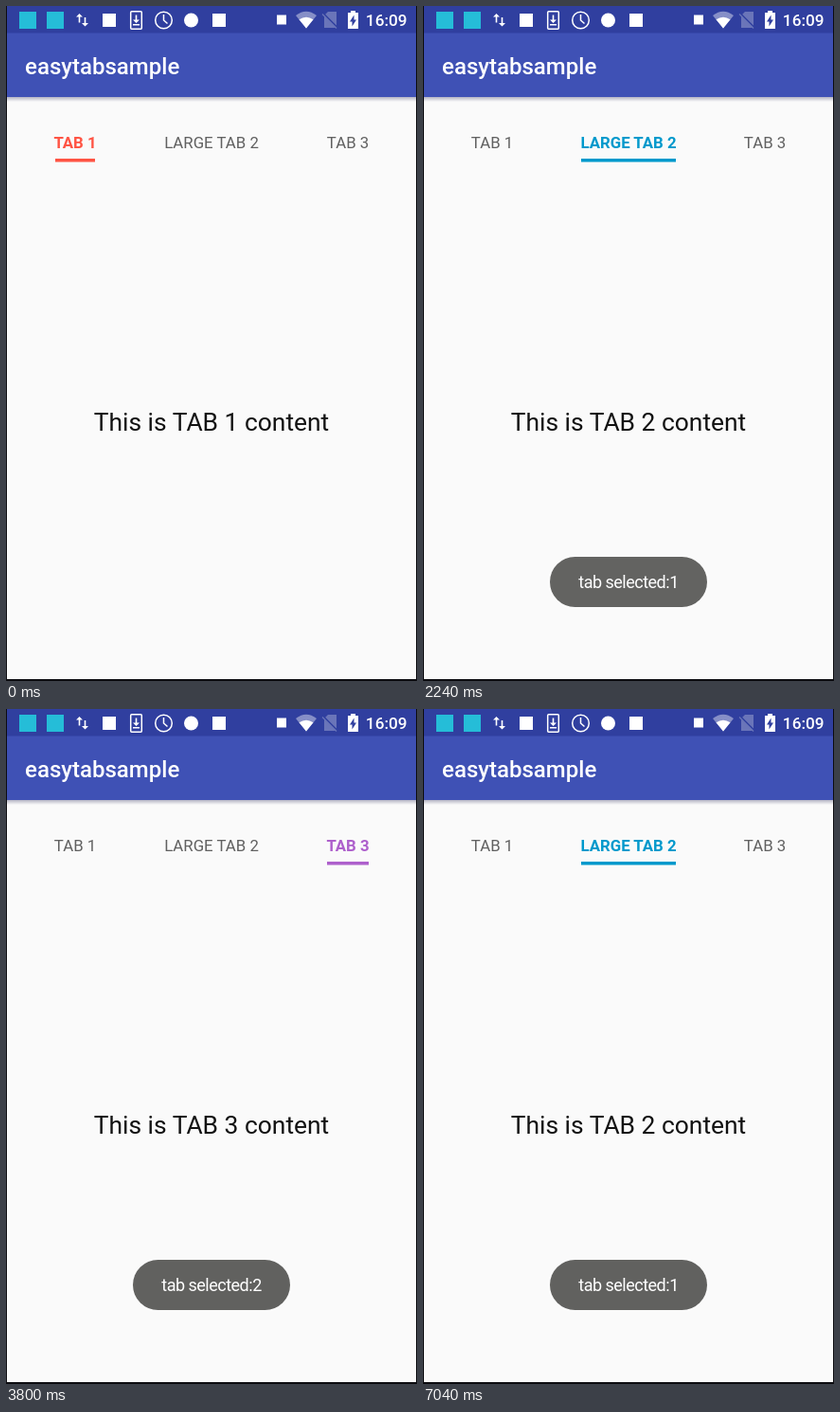
Write an HTML page that moves like this. It is 434 by 712 pixels and loops after 8 s.

```html
<!DOCTYPE html>
<html lang="en">
<head>
<meta charset="utf-8">
<title>Tabs</title>
<style>
  html, body { margin: 0; width: 100%; height: 100%; overflow: hidden; background: #fafafa; }
  svg { display: block; width: 434px; height: 712px; font-family: Roboto, sans-serif; }
  .mid { text-anchor: middle; }
  .tab { font-size: 16.8px; }
  .page { font-size: 26.4px; fill: #121212; }
  .toast { font-size: 18px; letter-spacing: -.5px; fill: #fff; }
</style>
</head>
<body>
<svg viewBox="0 0 434 712">
  <defs>
    <linearGradient id="shade" x2="0" y2="1">
      <stop offset="0" stop-color="#b4b4c4"/>
      <stop offset="1" stop-color="#fafafa"/>
    </linearGradient>
  </defs>
  <rect width="434" height="712" fill="#fafafa"/>
  <g id="pages"></g>
  <rect y="96" width="434" height="5" fill="url(#shade)"/>
  <rect y="28" width="434" height="68" fill="#3f51b5"/>
  <rect width="434" height="28.5" fill="#303f9f"/>
  <text x="20" y="71.5" font-size="24" font-weight="500" fill="#fff">easytabsample</text>

  <g fill="#fff">
    <g fill="#25bdd8">
      <rect x="14" y="6" width="18" height="18"/>
      <rect x="43" y="6" width="18" height="18"/>
    </g>
    <path d="M77.500 8l3.500 3.500h-2.700v6h-1.600v-6H74zM83.500 21.500L80 18h2.700v-6h1.600v6H87z"/>
    <rect x="102" y="8" width="14" height="14"/>
    <path d="M136.700 9.500h1.600v5h2.700l-3.500 3.500-3.500-3.500h2.700zM134 19h7v1.500h-7z"/>
    <g fill="none" stroke="#fff" stroke-width="1.500">
      <rect x="131.700" y="5.700" width="11.600" height="18.600" rx="1"/>
      <circle cx="166.500" cy="15" r="8.800"/>
      <path d="M166.500 9v6l4 3.500"/>
    </g>
    <circle cx="195.500" cy="15" r="7.500"/>
    <rect x="218" y="8" width="14" height="14"/>
    <rect x="286" y="9.500" width="10" height="10"/>
    <path d="M306 10Q317 1.500 328 10L317 23.500z" opacity=".42"/>
    <path d="M309.500 14.300Q317 9 324.500 14.300L317 23.500z"/>
    <path d="M340 6h9v17h-13V10z" fill="#6a75b9"/>
    <path d="M334 7l16 16" stroke="#303f9f" stroke-width="2"/>
    <path d="M334 8.500l15 15" stroke="#6a75b9" stroke-width="1.300"/>
    <path d="M364 5h5v2h3v17h-11V7h3z"/>
    <path d="M367.500 9.500v5h2.500l-4.500 7v-5H363z" fill="#303f9f"/>
    <text x="423.500" y="21" font-size="17.200" font-weight="500" text-anchor="end">16:09</text>
  </g>

  <g id="tabs"></g>
  <rect id="bar" y="161" height="3.500"/>
  <circle id="touch" fill="#fff" fill-opacity=".65" stroke="#cbcbdc" stroke-width="1.500"/>
  <g id="toast">
    <rect x="134" y="581" width="166" height="53" rx="26.500" fill="#61615f"/>
    <text id="note" class="toast mid" x="217" y="614"></text>
  </g>
  <path d="M.5 0V712M433.500 0V712" stroke="#0c0c10"/>
  <path d="M0 711H434" stroke="#0c0c10" stroke-width="2"/>
</svg>
<script>
const LOOP = 8000, WIDTH = 432, DELAY = 180, STAY = 1960, FADE = 500;
const TABS = [
  { label: 'TAB 1', mid: 73, x: 52, w: 42, color: [255, 84, 68] },
  { label: 'LARGE TAB 2', mid: 217, x: 167, w: 100, color: [0, 153, 204] },
  { label: 'TAB 3', mid: 361, x: 339, w: 44, color: [174, 96, 204] }
];
const TAPS = [
  { at: 40, from: 0, to: 1, x: 215, y: 140 },
  { at: 3080, from: 1, to: 2, x: 358, y: 145 },
  { at: 6320, from: 2, to: 1, x: 196, y: 138 }
];

const $ = id => document.getElementById(id);
const clamp = v => Math.max(0, Math.min(1, v));
const mix = (a, b, k) => a + (b - a) * k;
const rgb = c => `rgb(${c.map(Math.round)})`;
const set = (el, attrs) => {
  for (const k in attrs) el.setAttribute(k, attrs[k]);
  return el;
};
const text = (parent, cls, x, y, str) => {
  const el = document.createElementNS('http://www.w3.org/2000/svg', 'text');
  el.textContent = str;
  parent.append(set(el, { class: cls + ' mid', x, y }));
  return el;
};

const labels = TABS.map(t => text($('tabs'), 'tab', t.mid, 150, t.label));
TABS.forEach((t, i) =>
  text($('pages'), 'page', 217 + i * WIDTH, 447.5, `This is TAB ${i + 1} content`));

const quint = k => 1 - (1 - k) ** 5;
const smooth = k => k * k * (3 - 2 * k);

function draw(t) {
  const tap = TAPS.filter(e => t >= e.at).pop() || TAPS[0];
  const age = t - tap.at, run = age - DELAY;
  const a = TABS[tap.from], b = TABS[tap.to];

  const page = mix(tap.from, tap.to, quint(clamp(run / 200)));
  set($('pages'), { transform: `translate(${-page * WIDTH} 0)` });

  const current = run >= 0 ? tap.to : tap.from;
  labels.forEach((el, i) => set(el, {
    'font-weight': i === current ? 700 : 400,
    fill: i === current ? rgb(TABS[i].color) : '#616161'
  }));

  const k = smooth(clamp(run / 300));
  set($('bar'), {
    x: mix(a.x, b.x, k),
    width: mix(a.w, b.w, k),
    fill: rgb(a.color.map((v, i) => mix(v, b.color[i], k)))
  });

  set($('touch'), {
    cx: tap.x,
    cy: tap.y,
    r: mix(13.5, 16, clamp(age / 120)),
    opacity: age < 0 ? 0 : 1 - clamp((age - 160) / 160)
  });

  const shown = 1 - (1 - clamp(run / FADE)) ** 2;
  const gone = clamp((run - STAY) / FADE) ** 2;
  set($('toast'), { opacity: shown * (1 - gone) });
  $('note').textContent = 'tab selected:' + tap.to;
}

const start = performance.now();
function tick() {
  draw((performance.now() - start) % LOOP);
  requestAnimationFrame(tick);
}
tick();
</script>
</body>
</html>
```
